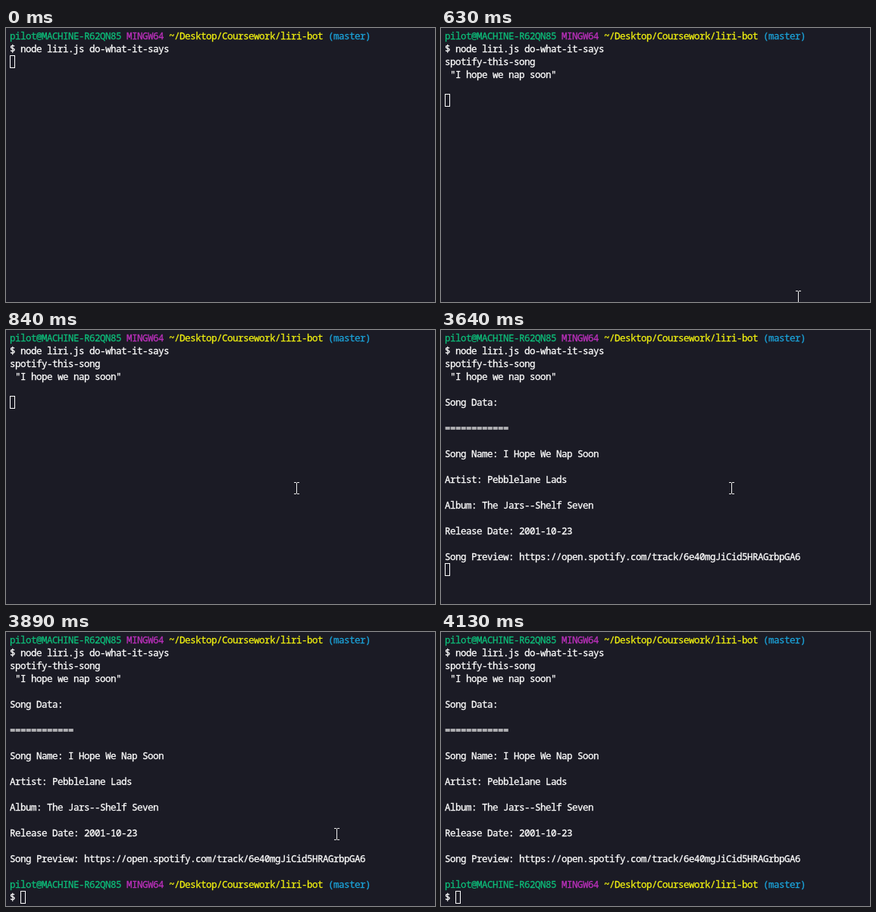
An HTML page that plays this animation: 566x362 px, repeating every 5.28 s.

```html
<!DOCTYPE html>
<html lang="en">
<head>
<meta charset="utf-8">
<title>Terminal session</title>
<style>
  html, body { margin: 0; width: 100%; height: 100%; overflow: hidden; background: #1b1b25; }
  #stage { position: relative; width: 566px; height: 362px; overflow: hidden; }
  .row {
    position: absolute; left: 5px; margin: 0; white-space: pre; color: #fff;
    font: 12.5px/17px "Noto Sans Mono", "DejaVu Sans Mono", monospace;
    letter-spacing: -.5px; -webkit-text-stroke: .3px currentColor;
    font-variant-ligatures: none;
  }
  .user { color: #0dbc79; }
  .system { color: #bc30bc; }
  .path { color: #f0f010; }
  .branch { color: #1ba3da; }
  #caret {
    position: absolute; left: 0; top: 0; width: 7px; height: 17px;
    box-sizing: border-box; border: 1px solid #fff;
  }
  #pointer { position: absolute; left: 0; top: 0; }
</style>
</head>
<body>
<div id="stage">
  <div id="caret"></div>
  <svg id="pointer" width="7" height="16" shape-rendering="crispEdges">
    <path d="M0 .5h3M4 .5h3M3.5 1v14M0 15.5h3M4 15.5h3" fill="none" stroke="#f0f0f0"/>
  </svg>
</div>
<script>
const LOOP = 5280, CELL = 7, LINE = 17, LEFT = 5, TOP = 2, STEP = 30;
const stage = document.getElementById('stage');
const caret = document.getElementById('caret');
const pointer = document.getElementById('pointer');

const prompt = [
  ['user', 'pilot@MACHINE-R62QN85 '],
  ['system', 'MINGW64 '],
  ['path', '~/Desktop/Coursework/liri-bot '],
  ['branch', '(master)']
];

// [appears at ms, row, text or coloured parts]
const lines = [
  [0, 0, prompt],
  [0, 1, '$ node liri.js do-what-it-says'],
  [170, 2, 'spotify-this-song'],
  [170, 3, ' "I hope we nap soon"'],
  [3640, 5, 'Song Data:'],
  [3640, 7, '============'],
  [3640, 9, 'Song Name: I Hope We Nap Soon'],
  [3640, 11, 'Artist: Pebblelane Lads'],
  [3640, 13, 'Album: The Jars--Shelf Seven'],
  [3640, 15, 'Release Date: 2001-10-23'],
  [3640, 17, 'Song Preview: https://open.spotify.com/track/6e40mgJiCid5HRAGrbpGA6'],
  [3740, 19, prompt],
  [3740, 20, '$ ']
].map(([from, row, content]) => {
  const el = document.createElement('pre');
  el.className = 'row';
  el.style.top = TOP + row * LINE + 'px';
  for (const [color, text] of Array.isArray(content) ? content : [['', content]]) {
    const span = document.createElement('span');
    span.className = color;
    span.textContent = text;
    el.append(span);
  }
  stage.insertBefore(el, caret);
  return { el, from };
});

// [ms, column, row]
const caretSteps = [[0, 0, 2], [170, 0, 5], [3640, 0, 18], [3740, 2, 20]];

// [ms, x, y] of the pointer's top left corner
const pointerPath = [
  [630, 468, 347], [840, 380, 201], [3750, 380, 201],
  [4020, 500, 331], [4110, 512, 358]
];

const place = (el, x, y) => {
  el.style.transform = `translate(${Math.round(x)}px, ${Math.round(y)}px)`;
};

function pointerAt(t) {
  const sampled = Math.floor(t / STEP) * STEP;
  const next = pointerPath.findIndex(p => p[0] >= sampled);
  const i = next < 0 ? pointerPath.length - 1 : Math.max(1, next);
  const [t0, x0, y0] = pointerPath[i - 1];
  const [t1, x1, y1] = pointerPath[i];
  const k = Math.min(1, (sampled - t0) / (t1 - t0));
  return [x0 + (x1 - x0) * k, y0 + (y1 - y0) * k];
}

function render(t) {
  for (const { el, from } of lines) el.style.visibility = t >= from ? 'visible' : 'hidden';

  const [, column, row] = caretSteps.filter(s => s[0] <= t).pop();
  place(caret, LEFT + column * CELL, TOP + row * LINE);

  const shown = t >= 630 && t < 4130;
  pointer.style.visibility = shown ? 'visible' : 'hidden';
  if (shown) place(pointer, ...pointerAt(t));
}

const start = performance.now();
function tick(now) {
  render(Math.max(0, now - start) % LOOP);
  requestAnimationFrame(tick);
}
render(0);
requestAnimationFrame(tick);
</script>
</body>
</html>
```
